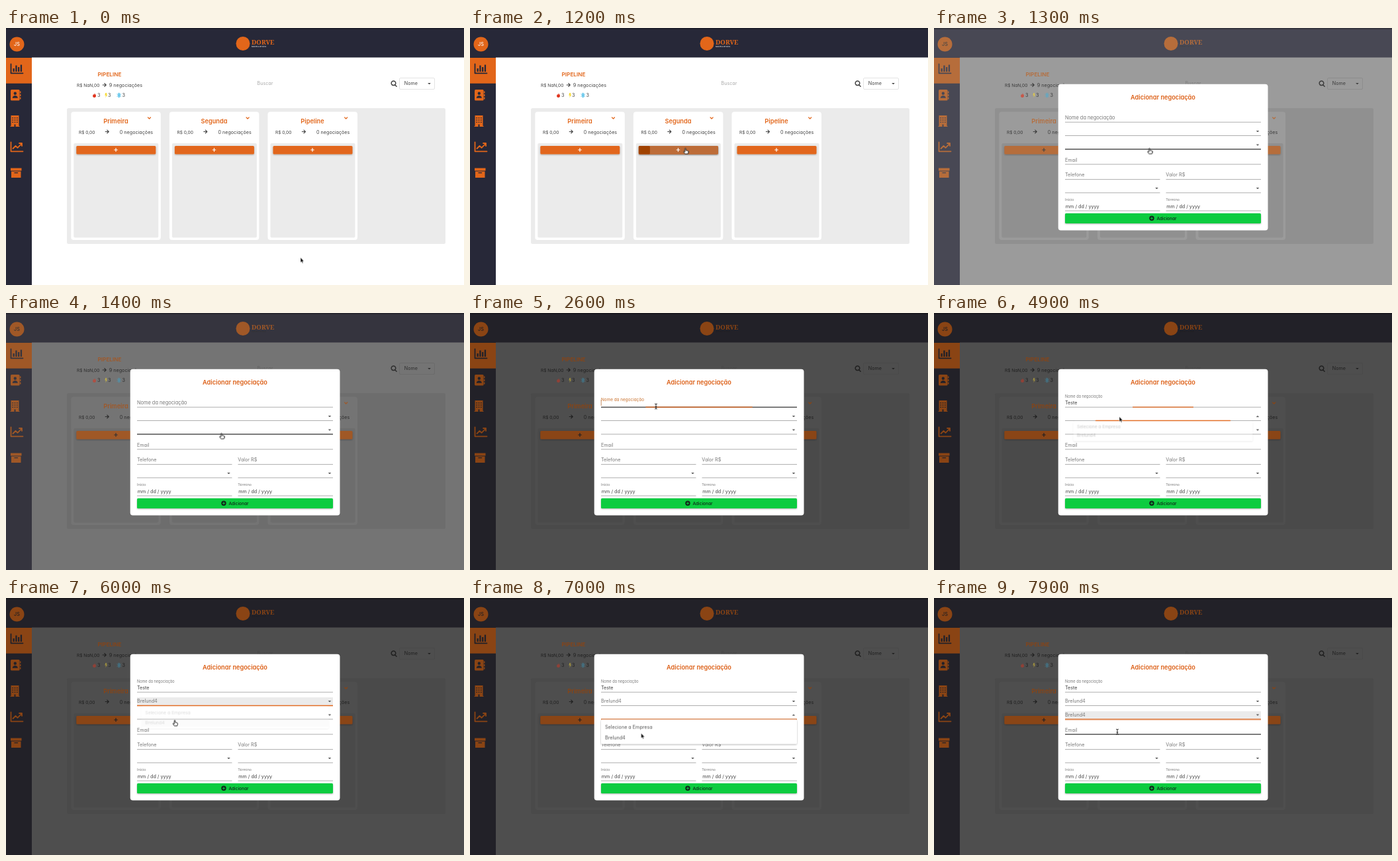
These frames come from a looping animation (692 px wide and 388 px high, 8000 ms). An HTML page:

```html
<!DOCTYPE html>
<html lang="pt-BR">
<head>
<meta charset="utf-8">
<title>Pipeline</title>
<style>
@property --bar { syntax: "<color>"; inherits: true; initial-value: #272838; }
@property --orange { syntax: "<color>"; inherits: true; initial-value: #e2661a; }
@property --paper { syntax: "<color>"; inherits: true; initial-value: #fff; }
@property --panel { syntax: "<color>"; inherits: true; initial-value: #ebebeb; }
@property --ink { syntax: "<color>"; inherits: true; initial-value: #444; }
@property --muted { syntax: "<color>"; inherits: true; initial-value: #aaa; }
@property --edge { syntax: "<color>"; inherits: true; initial-value: #ddd; }
@property --light { syntax: "<color>"; inherits: true; initial-value: #fff; }

html, body { margin: 0; width: 100%; height: 100%; overflow: hidden; background: #fff; }
svg { display: block; width: 692px; height: 388px; }
text { font-family: Inter, "Open Sans", sans-serif; font-feature-settings: "cv11"; font-size: 7.2px; }
.mid { text-anchor: middle; }
.bold { font-weight: 600; font-size: 9.2px; }
.money { font-size: 6.6px; }

/* one 8 s clock: 1.25% is 100 ms */
.a { animation: 8s linear infinite both; }
.step { animation-timing-function: step-end; }

/* page behind the dialog */
#page { animation-name: dim; }
@keyframes dim {
  16.25% { --bar: #484854; --orange: #b66d3b; --paper: #9b9b9b; --panel: #909090; --ink: #3c3c3c; --muted: #7c7c7c; --edge: #8a8a8a; --light: #444; }
  18.75%, 100% { --bar: #222128; --orange: #8a4414; --paper: #4e4e4e; --panel: #4a4a4a; --ink: #202020; --muted: #474747; --edge: #494949; --light: #1f1e22; }
  0%, 15.4% { --bar: #272838; --orange: #e2661a; --paper: #fff; --panel: #ebebeb; --ink: #444; --muted: #aaa; --edge: #ddd; --light: #fff; }
}
.bar { fill: var(--bar); }
.orange { fill: var(--orange); }
.paper { fill: var(--paper); }
.panel { fill: var(--panel); }
.ink { fill: var(--ink); }
.muted { fill: var(--muted); }
.light { fill: var(--light); }
.line { fill: none; stroke-linecap: round; stroke-linejoin: round; }
#tags { animation-name: tags; }
@keyframes tags { 0%, 15.4% { opacity: 1; } 16.25% { opacity: .65; } 18.75%, 100% { opacity: .45; } }
#hover { animation-name: hover; }
@keyframes hover { 0%, 10.7% { opacity: 0; } 12.5%, 100% { opacity: 1; } }
#press { animation-name: press; }
@keyframes press { 0% { opacity: 0; } 14.2%, 100% { opacity: 1; } }

/* dialog */
#dialog { animation-name: pop; }
@keyframes pop { 0%, 15.4% { opacity: 0; } 16.15%, 100% { opacity: 1; } }
.field { fill: #777; }
.rule { stroke: #8c8c8c; stroke-width: .7; }
.dark { stroke: #222; stroke-width: 1; }
.focus { stroke: #e2661a; stroke-width: 1.3; transform-origin: 346px 0; }
.tri { fill: #555; transform-box: fill-box; transform-origin: 50% 50%; }

#nameHover { animation-name: nameHover; }
@keyframes nameHover { 0%, 53.1% { opacity: 0; } 28.75% { opacity: 1; } }
#firstHover { animation-name: firstHover; }
@keyframes firstHover { 0%, 60.4% { opacity: 0; } 54.4% { opacity: 1; } }
#secondHover { animation-name: secondHover; }
@keyframes secondHover { 0%, 78.75% { opacity: 1; } 27.2%, 80.4% { opacity: 0; } 100% { opacity: 0; } }
#emailHover { animation-name: emailHover; }
@keyframes emailHover { 0% { opacity: 0; } 95%, 100% { opacity: 1; } }

#nameFocus { animation-name: nameFocus; animation-timing-function: cubic-bezier(0, 0, .2, 1); }
@keyframes nameFocus { 0%, 31.94% { transform: scaleX(0); } 34.44%, 60.42% { transform: scaleX(1); } 62.92%, 100% { transform: scaleX(0); } }
#label { animation-name: float; animation-timing-function: cubic-bezier(0, 0, .2, 1); }
@keyframes float {
  0%, 31.94% { transform: translate(198px, 138.2px); }
  34.44%, 100% { transform: translate(198px, 128.4px) scale(.75); }
}
#label text { animation-name: tint; }
@keyframes tint { 0%, 60.42% { fill: #777; } 31.94% { fill: #c8702c; } 100% { fill: #777; } }
#typed { animation-name: type; }
@keyframes type {
  0% { clip-path: inset(0 100% 0 0); }
  43.75% { clip-path: inset(0 76% 0 0); }
  45% { clip-path: inset(0 54% 0 0); }
  46.25% { clip-path: inset(0 35% 0 0); }
  47.5% { clip-path: inset(0 22% 0 0); }
  48.75%, 100% { clip-path: inset(0); }
}
#caret { animation-name: caret; }
@keyframes caret {
  0%, 38.75%, 60.42%, 100% { opacity: 0; transform: none; }
  31.94% { opacity: 1; transform: none; }
  43.75% { opacity: 1; transform: translateX(4.8px); }
  45% { opacity: 1; transform: translateX(9px); }
  46.25% { opacity: 1; transform: translateX(12.8px); }
  47.5% { opacity: 1; transform: translateX(15.4px); }
  48.75% { opacity: 1; transform: translateX(19.6px); }
}

/* both selects share their timing, the second runs 1.6 s later */
.later .a { animation-delay: 1.6s; animation-fill-mode: backwards; }
.back { animation-name: back; }
@keyframes back { 0%, 80.42% { opacity: 0; } 73.75% { opacity: 1; } 100% { opacity: 0; } }
.select .focus { animation-name: selectFocus; animation-timing-function: cubic-bezier(0, 0, .2, 1); }
@keyframes selectFocus { 0%, 60.42% { transform: scaleX(0); } 62.92%, 80.42% { transform: scaleX(1); } 82.92%, 100% { transform: scaleX(0); } }
.select .tri { animation-name: flip; }
@keyframes flip { 0%, 73.75% { transform: none; } 60.42% { transform: rotate(180deg); } 100% { transform: none; } }
.menu { animation-name: menu; transform-origin: 346px 163px; }
@keyframes menu {
  0%, 60.42% { opacity: 0; transform: scale(.75, .5625); }
  61.25% { opacity: .32; transform: scale(.915, .82); }
  63.5%, 73.75% { opacity: 1; transform: none; }
  75% { opacity: .22; transform: scale(.958, .918); }
  76.2%, 100% { opacity: 0; transform: scale(.75, .5625); }
}
.row { animation-name: row; }
@keyframes row { 0% { opacity: 0; } 69.4%, 100% { opacity: 1; } }
#firstValue { animation-name: firstValue; }
@keyframes firstValue { 0% { opacity: 0; } 73.75%, 100% { opacity: 1; } }
#secondValue { animation-name: secondValue; }
@keyframes secondValue { 0% { opacity: 0; } 93.75%, 100% { opacity: 1; } }

/* pointer */
#pointer { animation-name: move; animation-timing-function: ease-in-out; }
@keyframes move {
  0%, 1.25% { transform: translate(445px, 346.5px); }
  11.25%, 26.25% { transform: translate(325.5px, 181.5px); }
  30.6%, 51.25% { transform: translate(281px, 141px); }
  56.25%, 66.25% { transform: translate(280px, 156.5px); }
  71.25%, 77.5% { transform: translate(255px, 184.5px); }
  79.8%, 83.75% { transform: translate(262px, 177px); }
  88.75%, 94.4% { transform: translate(258px, 208px); }
  98.1%, 100% { transform: translate(277px, 202px); }
}
#arrow { animation-name: arrow; }
@keyframes arrow { 0%, 60.42%, 80.42% { opacity: 1; } 10.7%, 69.4%, 88% { opacity: 0; } 100% { opacity: 0; } }
#hand { animation-name: hand; }
@keyframes hand { 0%, 28.75%, 60.42%, 80.42%, 95% { opacity: 0; } 10.7%, 54.4%, 69.4%, 88% { opacity: 1; } 100% { opacity: 0; } }
#beam { animation-name: beam; }
@keyframes beam { 0%, 43.75%, 54.4% { opacity: 0; } 28.75%, 51.25%, 95% { opacity: 1; } 100% { opacity: 1; } }
</style>
</head>
<body>
<svg viewBox="0 0 692 388">
  <defs>
    <filter id="soft" x="-10%" y="-10%" width="120%" height="130%">
      <feDropShadow dx="0" dy="1" stdDeviation="1" flood-opacity=".3"/>
    </filter>
    <path id="go" d="M-2.6 0H2.4M0-2.4 2.4 0 0 2.4" class="line" stroke="var(--ink)" stroke-width="1.2"/>
    <path id="plus" d="M-2.3 0H2.3M0-2.3V2.3" class="line" stroke="var(--light)" stroke-width="1.2"/>
    <path id="drop" d="M-2.3-1.1H2.3L0 1.3Z"/>
    <g id="column">
      <rect width="135.5" height="193.5" y="126.5" rx="4" class="paper"/>
      <path d="M116.2 135l2 2 2-2" class="line" stroke="var(--orange)" stroke-width="1.2"/>
      <use href="#go" x="54.5" y="156.5"/>
      <rect x="4" y="174" width="128" height="142.5" rx="2" class="panel"/>
      <rect x="8" y="178" width="120" height="12.6" rx="1.6" class="orange" filter="url(#soft)"/>
    </g>
  </defs>

  <g id="page" class="a">
    <rect width="692" height="388" class="paper"/>
    <path d="M0 0H692V44.5H39V388H0Z" class="bar"/>
    <rect width="692" height="2" opacity=".25"/>
    <rect y="45" width="39" height="38.7" class="orange"/>
    <circle cx="16.5" cy="24.5" r="11" class="orange"/>
    <text x="16.5" y="27.2" class="mid light" font-weight="500">JS</text>

    <circle cx="358" cy="23.5" r="10.5" class="orange"/>
    <text x="371" y="25.3" class="orange" style="font: 700 9.6px 'Noto Serif', serif">DORVE</text>
    <text x="371" y="29.2" class="light" style="font-size: 2.6px">Business services</text>

    <path d="M7.5 54.5V68.3H25.5" class="line" stroke="var(--bar)" stroke-width="1.8"/>
    <path d="M10.5 61h2.3v5h-2.3zM14.3 56.5h2.3V66h-2.3zM18 59h2.3v7H18zM21.8 55.5h2.3V66h-2.3z" class="bar"/>

    <rect x="7" y="93" width="13.6" height="16.5" rx="1.6" class="orange"/>
    <path d="M21 95.5h1.4v3H21zM21 100h1.4v3H21zM21 104.5h1.4v3H21z" class="orange"/>
    <circle cx="13.8" cy="98.8" r="2.2" class="bar"/>
    <path d="M9.8 105.8c0-5 8-5 8 0Z" class="bar"/>

    <path d="M7.5 132H19.5V148H20.5V149H6.5V148H7.5Z" class="orange"/>
    <path d="M10.2 135v9M13.5 135v9M16.8 135v9" stroke="var(--bar)" stroke-width="1.5" stroke-dasharray="1.5 1.7"/>
    <path d="M12.5 145.5h2V149h-2z" class="bar"/>

    <path d="M7.5 172.3V186.3H25.5" class="line" stroke="var(--orange)" stroke-width="1.8"/>
    <path d="M10.5 182l4-4 3 2.8 6-6M20 174h4v4" class="line" stroke="var(--orange)" stroke-width="1.8"/>

    <path d="M7 211.5H23.5V215.5H7ZM8 216.5H22.5V226H8Z" class="orange"/>
    <path d="M13 218.7h4.5" class="line" stroke="var(--bar)" stroke-width="1.3"/>

    <text x="156.5" y="73" class="mid bold orange" style="font-size: 8.2px">PIPELINE</text>
    <text x="107" y="89" class="ink money">R$ NaN,00</text>
    <use href="#go" x="148.8" y="86"/>
    <text x="155.8" y="89" class="ink">9 negociações</text>
    <g id="tags" class="a">
      <path d="M133.8 98c.4 2 2.4 2.5 2.2 4.8-.2 3-4.8 3-4.9 0 0-1.500.8-1.800.9-3 .6.300.8.8.9 1.300.8-.8 1-1.800.9-3.100Z" fill="#e0331c"/>
      <path d="M150.300 98h2l-.6 2.400h1.600l-3 4.800.6-3.500h-1.600Z" fill="#f7d92f"/>
      <path d="M170.800 98.200v6.600M168 99.900l5.600 3.200M168 103.100l5.600-3.200M169.600 98.800l1.200 1 1.200-1M169.600 104.200l1.200-1 1.200 1" class="line" stroke="#32b4e6" stroke-width=".9"/>
    </g>
    <g class="ink">
      <text x="138" y="104.200">3</text>
      <text x="154" y="104.200">3</text>
      <text x="175.400" y="104.200">3</text>
    </g>

    <text x="379.500" y="86.200" class="muted">Buscar</text>
    <path d="M587.900 86l2.200 2.300M588.800 83.300a3.300 3.300 0 1 1-6.600 0 3.300 3.300 0 1 1 6.600 0" class="line" stroke="var(--ink)" stroke-width="1.500"/>
    <rect x="594.500" y="75.500" width="53" height="17" rx="1.500" class="paper" stroke="var(--edge)" stroke-width=".8"/>
    <text x="601.800" y="86.300" class="ink">Nome</text>
    <use href="#drop" x="639.500" y="84" class="ink"/>

    <rect x="92" y="121" width="572" height="205" rx="2.500" class="panel"/>
    <use href="#column" x="98.300"/>
    <use href="#column" x="246.900"/>
    <use href="#column" x="395.500"/>
    <g id="hover" class="a">
      <rect x="254.900" y="178" width="120" height="12.600" rx="1.600" fill="#bd6c39" filter="url(#soft)"/>
      <rect id="press" class="a step" x="254.900" y="178" width="17" height="12.600" rx="1.600" fill="#a04200"/>
    </g>
    <use href="#plus" x="166" y="184"/>
    <use href="#plus" x="314.500" y="184"/>
    <use href="#plus" x="463" y="184"/>
    <g class="mid orange">
      <text x="166" y="144" class="bold">Primeira</text>
      <text x="314.500" y="144" class="bold">Segunda</text>
      <text x="463" y="144" class="bold">Pipeline</text>
    </g>
    <g class="ink">
      <text x="110" y="159.600" class="money">R$ 0,00</text>
      <text x="258.500" y="159.600" class="money">R$ 0,00</text>
      <text x="407" y="159.600" class="money">R$ 0,00</text>
      <text x="171.800" y="159.600">0 negociações</text>
      <text x="320.400" y="159.600">0 negociações</text>
      <text x="469" y="159.600">0 negociações</text>
    </g>
  </g>

  <g id="dialog" class="a">
    <rect x="187.700" y="84.800" width="316.800" height="220.700" rx="4" fill="#fff"/>
    <text x="346" y="108.200" class="mid bold" fill="#dc5f16">Adicionar negociação</text>

    <path class="rule" d="M198 142.200H494M198 162.500H494M198 183H494M198 205.800H494M198 228.600H341.500M350.500 228.600H494M198 248.800H341.500M350.500 248.800H494M198 276H341.500M350.500 276H494"/>
    <path id="nameHover" class="a step dark" d="M198 142.200H494"/>
    <path id="firstHover" class="a step dark" d="M198 162.500H494"/>
    <path id="secondHover" class="a step dark" d="M198 183H494"/>
    <path id="emailHover" class="a step dark" d="M198 205.800H494"/>
    <path id="nameFocus" class="a focus" d="M198 142.200H494"/>

    <g id="label" class="a"><text class="a step" style="font-size: 7.400px">Nome da negociação</text></g>
    <text id="typed" class="a step" x="198" y="138" fill="#444">Teste</text>
    <path id="caret" class="a step" d="M198.200 131V140" stroke="#b5703a" stroke-width=".8"/>

    <g class="field">
      <text x="198" y="201.500">Email</text>
      <text x="198" y="224.200">Telefone</text>
      <text x="350.300" y="224.200">Valor R$</text>
      <text x="198" y="261" style="font-size: 5.400px">Início</text>
      <text x="350.300" y="261" style="font-size: 5.400px">Término</text>
    </g>
    <text x="198.800" y="271.800" fill="#444">mm / dd / yyyy</text>
    <text x="351.200" y="271.800" fill="#444">mm / dd / yyyy</text>
    <use href="#drop" x="336.500" y="242" fill="#555"/>
    <use href="#drop" x="489" y="242" fill="#555"/>

    <rect x="198" y="279.800" width="296" height="15.200" rx="1.600" fill="#08cc3f" filter="url(#soft)"/>
    <circle cx="329" cy="287.300" r="3.700" fill="#10251a"/>
    <path d="M327 287.300h4M329 285.300v4" stroke="#08cc3f" stroke-width="1"/>
    <text x="336.500" y="289.700" fill="#10251a" font-weight="500" style="font-size: 6.500px">Adicionar</text>

    <g class="select">
      <rect class="a step back" x="198" y="150" width="296" height="12.200" fill="#ebebeb"/>
      <path class="a focus" d="M198 162.500H494"/>
      <path class="a step tri" d="M486.700 154.900h4.600l-2.300 2.400Z"/>
    </g>
    <g class="select later" transform="translate(0 20.500)">
      <rect class="a step back" x="198" y="150" width="296" height="12.200" fill="#ebebeb"/>
      <path class="a focus" d="M198 162.500H494"/>
      <path class="a step tri" d="M486.700 154.900h4.600l-2.300 2.400Z"/>
    </g>
    <text id="firstValue" class="a step field" x="198" y="158.400">Brelund4</text>
    <text id="secondValue" class="a step field" x="198" y="178.900">Brelund4</text>

    <g>
      <g id="list" class="a menu" opacity="0">
        <rect x="198" y="163" width="296" height="37" rx="2" fill="#fff" filter="url(#soft)"/>
        <rect class="a step row" x="198" y="182" width="296" height="15.500" fill="#ececec"/>
        <text x="204" y="176.600" fill="#555">Selecione a Empresa</text>
        <text x="204" y="192.600" fill="#555">Brelund4</text>
      </g>
    </g>
    <g class="later" transform="translate(0 20.500)">
      <g class="a menu" opacity="0">
        <rect x="198" y="163" width="296" height="37" rx="2" fill="#fff" filter="url(#soft)"/>
        <rect class="a step row" x="198" y="182" width="296" height="15.500" fill="#ececec"/>
        <text x="204" y="176.600" fill="#555">Selecione a Empresa</text>
        <text x="204" y="192.600" fill="#555">Brelund4</text>
      </g>
    </g>
  </g>

  <g id="pointer" class="a">
    <path id="arrow" class="a step" d="M0 0V7.600L1.700 6.100 2.900 8.800 4.100 8.300 3 5.700H5.300Z" fill="#111" stroke="#fff" stroke-width=".5"/>
    <path id="hand" class="a step" d="M-.8 .8C-.8-.2 .8-.2 .8 .8V3.300L3.800 4C4.600 4.300 4.600 5.500 4.200 6.800L3.600 8.600H-.6L-2.800 5.500C-3 4.700-2.200 4.400-1.700 4.900L-.8 5.800Z" fill="#fff" stroke="#111" stroke-width=".9" stroke-linejoin="round"/>
    <path id="beam" class="a step line" d="M-1.500-3.900Q0-3.900 0-3Q0-3.900 1.500-3.900M0-3V3M-1.500 3.900Q0 3.900 0 3Q0 3.900 1.500 3.900M-1 .9H1" stroke="#111" stroke-width=".9"/>
  </g>
</svg>
</body>
</html>
```
